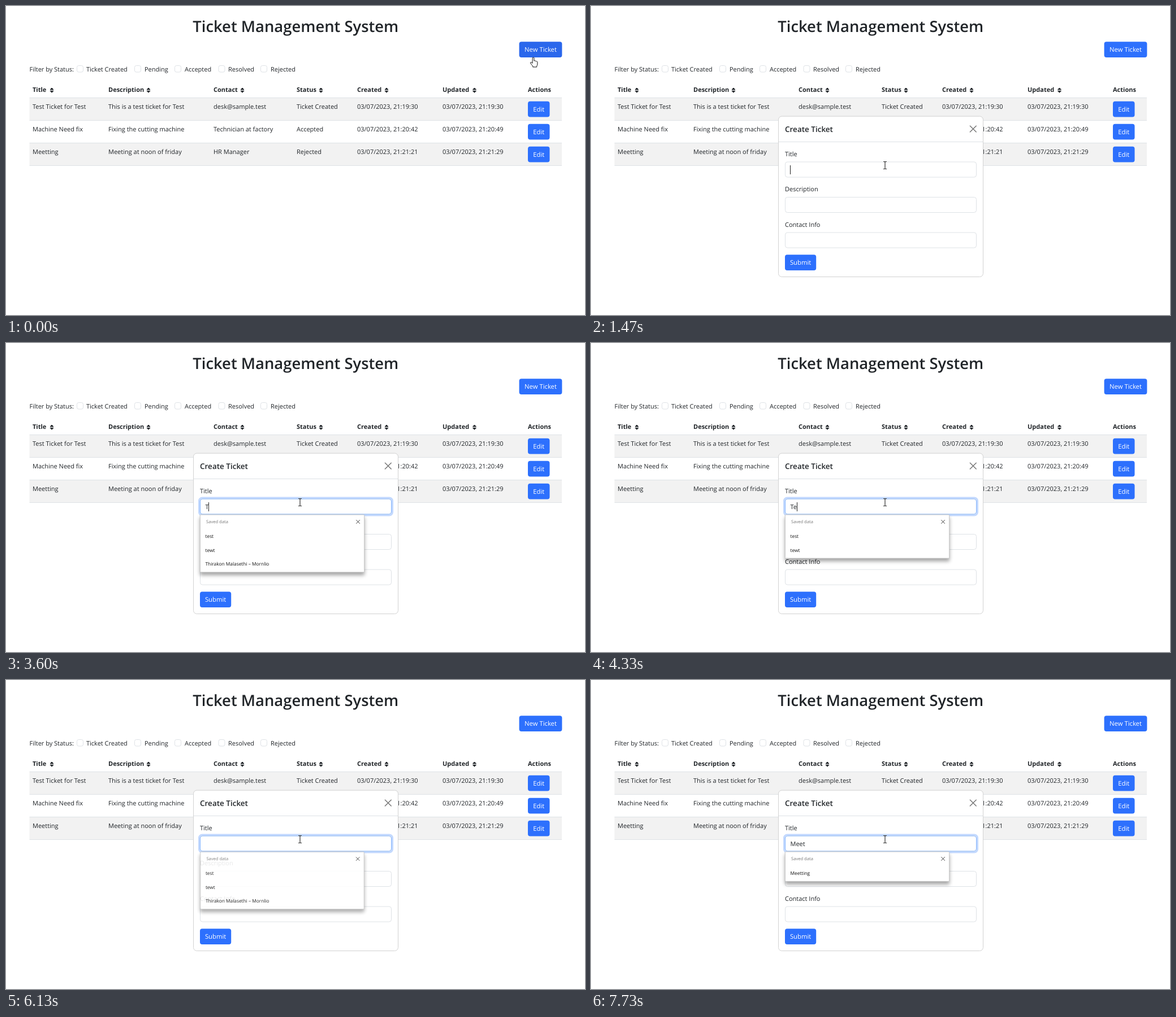
These frames come from a looping animation (1024x547 px, 8 s). An HTML page:

```html
<!DOCTYPE html>
<html lang="en">
<head>
<meta charset="utf-8">
<title>Ticket Management System</title>
<style>
  html, body { margin: 0; height: 100%; overflow: hidden; background: #fff; }
  svg { display: block; width: 100vw; height: 100vh; }
  text { font: 11px "Open Sans", "Noto Sans", sans-serif; fill: #212529; text-rendering: geometricPrecision; white-space: pre; }
  .h1 { font-size: 27.4px; font-weight: 600; }
  .h5 { font-size: 13.5px; font-weight: 600; }
  .th { font-weight: 700; }
  .mid { text-anchor: middle; }
  .white { font-size: 11.3px; fill: #fff; }
  .item { font-size: 8.35px; fill: #111; }
  .hint { font-size: 7.6px; fill: #767676; }
  .btn { fill: #2d70fd; }
  .box { fill: #fff; stroke: #dee2e6; }
  .line { stroke: #dee2e6; }
  .cursor { fill: #fff; stroke: #111; stroke-width: 1; stroke-linejoin: round; }
  #sheet { fill: #fff; stroke: #c4c4c4; filter: drop-shadow(0 5px 3px rgba(0, 0, 0, .35)); }
</style>
</head>
<body>
<svg viewBox="0 0 1024 547">
  <g id="page"></g>
  <g id="modal"></g>
  <g id="popup">
    <rect id="sheet" x="343.3" y="304" width="290.4" rx="1.5"/>
    <text class="hint" x="354" y="319.3">Saved data</text>
    <path d="M619.4 313.3l6.4 6.4m0-6.4l-6.4 6.4" stroke="#333"/>
    <g id="items"></g>
  </g>
  <path id="hand" class="cursor" d="M-1.4 1.3Q0-.8 1.4 1.3V6.6Q2.8 5.6 3.7 7Q5 6.3 5.8 7.7Q7.2 7.2 7.4 9V12.5Q7.2 14.5 6.2 15.8V17.5H-.8V15.8Q-3.2 13.4-5 10.4Q-4.8 8.2-2.9 9.3L-1.4 10.8Z"/>
  <path id="arrow" class="cursor" d="M0 0V14.5L3.4 11.4 5.6 16.6 7.8 15.6 5.7 10.6H10.3Z"/>
  <path id="beam" d="M-3-6.5H-.8L0-5.7.8-6.5H3M0-5.7V5.7M-3 6.5H-.8L0 5.7.8 6.5H3" fill="none" stroke="#333" stroke-width="1.2"/>
</svg>
<script>
const $ = id => document.getElementById(id);
const text = (x, y, s, cls = '', id = '') => `<text id="${id}" class="${cls}" x="${x}" y="${y}">${s}</text>`;
const rect = (x, y, w, h, cls, r = 4, id = '') =>
  `<rect id="${id}" class="${cls}" x="${x}" y="${y}" width="${w}" height="${h}" rx="${r}"/>`;
const rule = (x1, x2, y) => `<path class="line" d="M${x1} ${y}H${x2}"/>`;
const button = (x, y, w, s, id) =>
  rect(x, y, w, 27.7, 'btn', 4, id) + text(x + w / 2, y + 18, s, 'mid white');

// Table page
const cols = [47, 181, 367, 514, 621, 772, 923];
const heads = ['Title', 'Description', 'Contact', 'Status', 'Created', 'Updated', 'Actions'];
const sortX = [81, 252, 418, 557, 673, 828.5];
const rows = [
  ['Test Ticket for Test', 'This is a test ticket for Test', 'desk@sample.test', 'Ticket Created', '03/07/2023, 21:19:30', '03/07/2023, 21:19:30'],
  ['Machine Need fix', 'Fixing the cutting machine', 'Technician at factory', 'Accepted', '03/07/2023, 21:20:42', '03/07/2023, 21:20:49'],
  ['Meetting', 'Meeting at noon of friday', 'HR Manager', 'Rejected', '03/07/2023, 21:21:21', '03/07/2023, 21:21:29'],
];
const filters = [[125.5, 142, 'Ticket Created'], [227.5, 245, 'Pending'], [298.5, 316, 'Accepted'], [376, 393, 'Resolved'], [450.5, 468, 'Rejected']];

$('page').innerHTML =
  text(512.3, 45.5, 'Ticket Management System', 'h1 mid') +
  button(907.6, 63.3, 75.8, 'New Ticket', 'newBtn') +
  text(41.5, 115.7, 'Filter by Status:') +
  filters.map(([bx, x, s]) => rect(bx, 105.5, 11, 11.5, 'box', 3) + text(x, 115.7, s)).join('') +
  heads.map((s, i) => text(cols[i], 152, s, 'th')).join('') +
  sortX.map(x => `<path d="M${x} 145l3 3h-6zm0 8.3l3-3h-6z" fill="#212529" stroke="#212529" stroke-linejoin="round"/>`).join('') +
  rule(41.5, 983, 162.5) +
  rows.map((row, i) => {
    const y = 163 + 40 * i;
    return (i % 2 ? '' : `<rect x="41.5" y="${y}" width="941.5" height="39" fill="#f2f2f2"/>`) +
      rule(41.5, 983, y + 39.5) +
      row.map((s, c) => text(cols[c], y + 19, s)).join('') +
      button(923, y + 5.8, 38.5, 'Edit');
  }).join('');

// Dialog
const field = (label, y, id) => text(343, y - 10.5, label) + rect(343.5, y, 338, 27, 'box', 4, id);
$('modal').innerHTML =
  '<rect x="331.5" y="195.2" width="362" height="284.2" rx="6" fill="#fff" stroke="#d2d2d2"/>' +
  text(343, 223, 'Create Ticket', 'h5') +
  '<path d="M670.4 212.2l10.8 10.8m0-10.8l-10.8 10.8" stroke="#777" stroke-width="1.5" stroke-linecap="round"/>' +
  rule(332, 693, 240.5) +
  '<rect id="ring" x="341.5" y="274" width="342" height="31" rx="5.5" fill="none" stroke="#c2d8fe" stroke-width="3"/>' +
  field('Title', 276) + field('Description', 338.5) + field('Contact Info', 401) +
  '<rect id="focus" x="343.5" y="276" width="338" height="27" rx="4" fill="none" stroke="#86b7fe"/>' +
  text(352.5, 294, '', '', 'typed') +
  '<path id="squiggle" d="M352.5 296.5' + 'q1-2 2 0t2 0'.repeat(4) + '" fill="none" stroke="#d93025" stroke-width=".9"/>' +
  '<rect id="caret" y="282" width="1" height="16" fill="#222"/>' +
  button(343, 440.2, 55.2, 'Submit');

// Typing: [tick, value], 15 ticks per second
const typing = [[22, ''], [54, 'T'], [65, 'Te'], [68, 'Tes'], [87, 'Te'], [89, 'T'], [92, ''],
  [100, 'M'], [104, 'Me'], [106, 'Mee'], [108, 'Meet']];
const saved = ['Machine Need fix', 'Meetting', 'test', 'tewt', 'Thirakon Malasethi – Mornlio', 'Hello'];
const popupAlpha = n => n < 23 ? 0 : n < 24 ? .5 : n < 92 ? 1 : n < 95 ? .9 - (n - 92) * .35 : n < 102 ? 0 : 1;

const show = (id, on) => $(id).setAttribute('opacity', +on);
const clamp = v => Math.max(0, Math.min(1, v));
const bezier = (a, b, c, d, p) => {
  const q = 1 - p;
  return a * q * q * q + 3 * b * q * q * p + 3 * c * q * p * p + d * p * p * p;
};

function drawCursor(n) {
  const k = clamp((n - 10) / 8), p = k * k * (3 - 2 * k);
  const x = bezier(932.5, 800, 620, 520, p), y = bezier(90.5, 200, 370, 282, p);
  const inField = x > 343 && x < 682 && (y > 276 && y < 303 || y > 338 && y < 366);
  const kind = p === 0 ? 'hand' : inField ? 'beam' : 'arrow';
  for (const id of ['hand', 'arrow', 'beam']) show(id, id === kind);
  $(kind).setAttribute('transform', `translate(${x} ${y})`);
}

function drawModal(n) {
  const dt = n * 1000 / 15 - 50;
  const slide = -36 * (1 - clamp(dt / 300)) ** 2;
  show('modal', clamp(dt / 150));
  $('modal').setAttribute('transform', `translate(0 ${slide})`);
  $('newBtn').style.fill = n < 1 ? '#2a67ec' : '';
  const focus = clamp((n - 22) / 2);
  show('ring', focus);
  show('focus', focus);
}

function drawInput(n) {
  const [since, value] = typing.findLast(s => s[0] <= n) || [0, ''];
  $('typed').textContent = value;
  $('caret').setAttribute('x', Math.floor(352.9 + $('typed').getComputedTextLength()));
  show('caret', n >= 22 && n !== 92 && (n - since) % 16 < 8);
  show('squiggle', n >= 83 && n < 87);

  const alpha = popupAlpha(n), scale = 1 - .03 * (1 - alpha);
  const query = n >= 92 && n < 95 ? 't' : value.toLowerCase();
  const list = saved.filter(s => s.toLowerCase().startsWith(query));
  $('sheet').setAttribute('height', 27.7 + 24.7 * list.length);
  $('items').innerHTML = list.map((s, i) => text(352.5, 345 + 24.6 * i, s, 'item')).join('');
  show('popup', alpha);
  $('popup').setAttribute('transform', `translate(488.5 355) scale(${scale}) translate(-488.5 -355)`);
}

let last = -1;
function frame(now) {
  const n = Math.floor((now % 8000) * .015 + .06) % 120;
  if (n !== last) {
    drawCursor(n);
    drawModal(n);
    drawInput(n);
    last = n;
  }
  requestAnimationFrame(frame);
}
requestAnimationFrame(frame);
</script>
</body>
</html>
```
